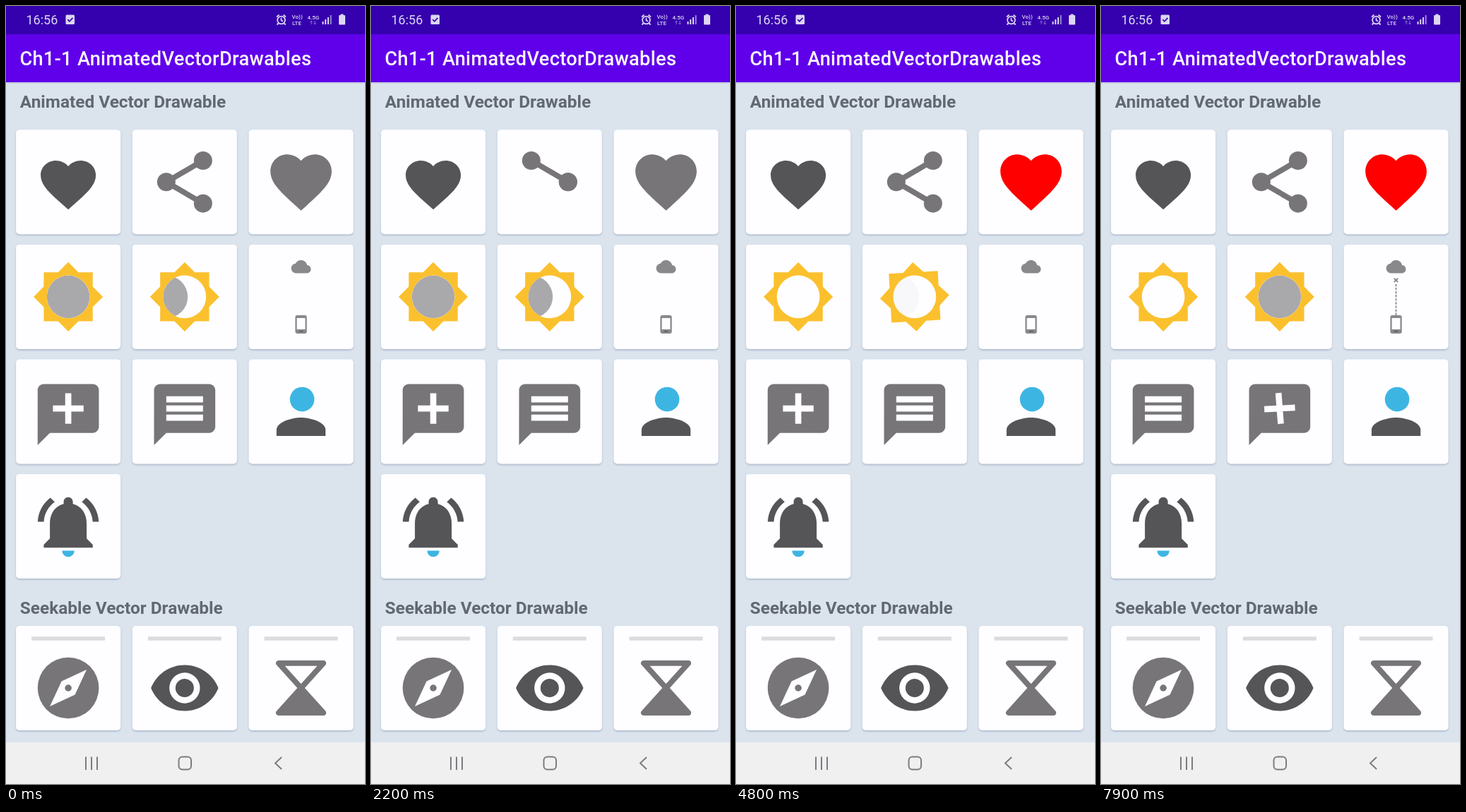
These frames come from a looping animation (508 by 1102 pixels, 8000 ms). An HTML page:

```html
<!DOCTYPE html>
<html lang="en">
<head>
<meta charset="utf-8">
<title>Animated vector icons</title>
<style>
html, body { margin: 0; width: 100%; height: 100%; overflow: hidden; background: #dbe3ed; }
svg { display: block; width: 100vw; height: 100vh; }
text { font-family: Roboto, sans-serif; }
.head { font-size: 24.4px; font-weight: 700; fill: #626871; }
.tiny { font-size: 8px; font-weight: 500; fill: #dcd6f2; }
.g { fill: #777578; }
.d { fill: #555457; }
.c { fill: #89888a; }
.w { fill: #fefdff; }
.y { fill: #fbc02d; }
.m { fill: #a9a8ab; }
.b { fill: #3db5e3; }
.line { stroke: #777578; fill: none; }
</style>
</head>
<body>
<svg id="stage" viewBox="0 0 508 1102" preserveAspectRatio="none"></svg>
<script>
const LOOP = 8000;
const UNIT = 104 / 24;
const COLS = [88.1, 252.8, 417.5];
const stage = document.getElementById('stage');

const HEART = 'M12 21.35l-1.45-1.32C5.4 15.36 2 12.28 2 8.5 2 5.42 4.42 3 7.5 3c1.74 0 3.41.81 4.5 2.09C13.09 3.81 14.76 3 16.5 3 19.58 3 22 5.42 22 8.5c0 3.78-3.4 6.86-8.55 11.54z';
const STAR = 'M20 8.69V4h-4.69L12 .69 8.69 4H4v4.69L.69 12 4 15.31V20h4.69L12 23.31 15.31 20H20v-4.69L23.31 12z';
const BUBBLE = 'M20 2H4c-1.1 0-1.99.9-1.99 2L2 22l4-4h14c1.1 0 2-.9 2-2V4c0-1.1-.9-2-2-2z';
const BELL = 'M7.58 4.08L6.15 2.65C3.75 4.48 2.17 7.3 2.03 10.5h2c.15-2.65 1.51-4.97 3.55-6.42zM19.97 10.5h2c-.15-3.2-1.73-6.02-4.12-7.85l-1.42 1.43c2.02 1.45 3.39 3.77 3.54 6.42zM18 11c0-3.07-1.64-5.64-4.5-6.32V4c0-.83-.67-1.5-1.5-1.5s-1.5.67-1.5 1.5v.68C7.63 5.36 6 7.92 6 11v5l-2 2v1h16v-1l-2-2z';
const EYE = 'M12 4.5C7 4.5 2.73 7.61 1 12c1.73 4.39 6 7.5 11 7.5s9.27-3.11 11-7.5c-1.73-4.39-6-7.5-11-7.5z';
const CLOUD = 'M19.35 10.04C18.67 6.59 15.64 4 12 4 9.11 4 6.6 5.64 5.35 8.04 2.34 8.36 0 10.91 0 14c0 3.31 2.69 6 6 6h13c2.76 0 5-2.24 5-5 0-2.64-2.05-4.78-4.65-4.96z';

const path = (d, cls, extra = '') => `<path d="${d}" class="${cls}" ${extra}/>`;
const dot = (x, y, r, cls, extra = '') => `<circle cx="${x}" cy="${y}" r="${r}" class="${cls}" ${extra}/>`;
const rect = (x, y, w, h, fill, extra = '') =>
  `<rect x="${x}" y="${y}" width="${w}" height="${h}" fill="${fill}" ${extra}/>`;
const icon = (x, y, body) =>
  `<g transform="translate(${x} ${y}) scale(${UNIT}) translate(-12 -12)">${body}</g>`;
const card = (x, y) => rect(x - 74, y - 74, 148, 148, '#fefdff', 'rx="5" filter="url(#shadow)"');

const sun = id => path(STAR, 'y', `id="${id}Star"`) + dot(12, 12, 7, 'w')
  + `<g clip-path="url(#disk)">${dot(12, 12, 7, 'm', `id="${id}Moon"`)}</g>`;
const chat = id => `<g transform="translate(0 1)">${path(BUBBLE, 'g')}${path('', 'w', `id="${id}Mark"`)}</g>`;

const share = `<g id="share">
  <path id="arm" class="line" stroke-width="1.8"/>
  ${path('M6 12L18 19', 'line', 'stroke-width="1.8"')}
  ${dot(6, 12, 3, 'g')}${dot(18, 19, 3, 'g')}${dot(18, 5, 3, 'g', 'id="tip"')}</g>`;
const person = dot(12.35, 8, 4, 'b')
  + path('M12 14c-2.67 0-8 1.34-8 4v2h16v-2c0-2.66-5.33-4-8-4z', 'd');
const bell = path(BELL, 'd') + path('M10 20h4a2 2 0 0 1-4 0z', 'b');
const compass = dot(12, 12, 10, 'g')
  + path('M14.19 14.19L6 18l3.81-8.19L18 6z', 'w') + dot(12, 12, 1.1, 'g');
const eye = path(EYE, 'd') + dot(12, 12, 5, 'w') + dot(12, 12, 3, 'd');
const glass = path('M4.7 3.9H19.3L4.7 20.1H19.3Z', 'line', 'stroke-width="1.8" stroke-linejoin="round"')
  + path('M12 12L4.7 20.1H19.3z', 'g');

const upload = `
  <g transform="translate(403.6 355.3) scale(1.16)">${path(CLOUD, 'c')}</g>
  <path d="M414.7 385.7l5.4 5.4m0-5.4l-5.4 5.4" stroke="#89888a" stroke-width="2" id="cross"/>
  <path id="link" stroke="#89888a" stroke-width="1.8" stroke-dasharray="3.4 1.7"/>
  ${rect(409.3, 438, 16.4, 26, '#89888a', 'rx="3"')}
  ${rect(411.6, 442, 11.8, 16, '#fefdff')}
  ${rect(414.8, 460, 5.6, 1.6, '#645a5c')}`;

const statusBar = `
  ${rect(0, 0, 508, 40, '#3500ad')}
  <text x="28.5" y="26" font-size="18" fill="#dcd6f2">16:56</text>
  ${rect(84.5, 12.5, 12.5, 13.5, '#dcd6f2', 'rx="1.5"')}
  <path d="M87.3 19.2l2.5 2.6 4.6-5" fill="none" stroke="#3500ad" stroke-width="1.7"/>
  <g fill="none" stroke="#dcd6f2" stroke-width="1.8">
    <circle cx="389.5" cy="20" r="5.4"/>
    <path d="M389.5 16.7v3.6l2.5 1.5M383 15.5l3.5-3M396 15.5l-3.5-3M385.4 24.5l-2 2M393.6 24.5l2 2"/>
  </g>
  <text class="tiny" x="404.5" y="18">Vo))</text><text class="tiny" x="405" y="26.5">LTE</text>
  <text class="tiny" x="426.5" y="18.5">4.5G</text>
  <path d="M432 26v-5m-1.6 1.6l1.6-1.6 1.6 1.6M437 21v5m-1.6-1.6l1.6 1.6 1.6-1.6" fill="none" stroke="#8f78d2"/>
  ${[4, 7, 10, 13].map((h, i) => rect(447.5 + i * 3.7, 26 - h, 2, h, i < 3 ? '#dcd6f2' : '#9d88d8')).join('')}
  ${rect(471, 13, 9, 13.5, '#dcd6f2', 'rx="1"')}${rect(473.5, 11.5, 4, 2, '#dcd6f2')}`;

const navBar = `
  ${rect(0, 1043, 508, 59, '#f0f0f1')}
  <g fill="none" stroke="#7c7b7e" stroke-width="2">
    <path d="M113 1063.5v18.5M121 1063.5v18.5M129 1063.5v18.5M390 1064l-9 8.5 9 8.5"/>
    <rect x="244.5" y="1063.5" width="17.5" height="18" rx="5"/>
  </g>`;

const rows = [249.3, 411.9, 574.4, 736.9, 952];
const icons = [
  [path(HEART, 'd', 'id="beat"'), share, path(HEART, 'g', 'id="like"')],
  [sun('a'), sun('b'), ''],
  [chat('p'), chat('q'), person],
  [bell],
  [compass, eye, glass]
];
const grid = icons.map((row, r) => row.map((body, c) => {
  const seek = r === 4;
  const bar = seek ? rect(COLS[c] - 52, 893.3, 104, 5.4, '#dcdbde') : '';
  return card(COLS[c], rows[r]) + bar + icon(COLS[c], rows[r] + (seek ? 14 : 0), body);
}).join('')).join('');

stage.innerHTML = `
  <defs>
    <filter id="shadow" x="-10%" y="-10%" width="120%" height="120%">
      <feDropShadow dx="0" dy="1.4" stdDeviation="1.3" flood-color="#54708a" flood-opacity=".4"/>
    </filter>
    <clipPath id="disk"><circle cx="12" cy="12" r="7"/></clipPath>
  </defs>
  ${rect(0, 0, 508, 1102, '#dbe3ed')}
  ${rect(0, 108, 508, 2, '#c9d0e0')}
  ${rect(0, 39, 508, 69, '#6000ea')}
  ${statusBar}
  <text x="19.5" y="84" font-size="27.17" font-weight="500" letter-spacing=".34" fill="#fdfaff">Ch1-1 AnimatedVectorDrawables</text>
  <text class="head" x="19.8" y="144">Animated Vector Drawable</text>
  <text class="head" x="19.8" y="861">Seekable Vector Drawable</text>
  ${grid}${upload}${navBar}`;

const part = {};
stage.querySelectorAll('[id]').forEach(el => part[el.id] = el);
const set = (id, name, value) => part[id].setAttribute(name, value);

const mix = (a, b, p) => a + (b - a) * p;
const span = (t, from, to) => Math.min(1, Math.max(0, (t - from) / (to - from)));
const ease = (t, from, to) => (1 - Math.cos(Math.PI * span(t, from, to))) / 2;

function drawSun(id, p, alpha) {
  set(id + 'Star', 'transform', `rotate(${-45 * p} 12 12)`);
  set(id + 'Moon', 'cx', mix(6, 12, p));
  set(id + 'Moon', 'opacity', alpha);
}

// p = 0 shows three lines, p = 1 a plus whose upright is folded from the outer lines.
function drawMark(id, p) {
  const half = mix(6, 5, p), gap = 3 * (1 - p), turn = p * 90;
  const bar = (y, deg) => {
    const a = deg * Math.PI / 180, c = Math.cos(a), s = Math.sin(a);
    const at = (x, v) => `${12 + x * c - v * s} ${10 + y + x * s + v * c}`;
    return `M${at(-half, -1)}L${at(half, -1)}L${at(half, 1)}L${at(-half, 1)}z`;
  };
  set(id + 'Mark', 'd', bar(0, 0) + bar(-gap, turn) + bar(gap, turn));
  set(id + 'Mark', 'transform', `rotate(${-180 * (1 - p)} 12 10)`);
}

function draw(t) {
  const pulse = (1 - Math.cos(span(t, 600, 1400) * 4 * Math.PI)) / 2;
  const size = mix(0.9, 1.04, pulse);
  set('beat', 'transform', `translate(12 13) scale(${size} ${size * 0.966}) translate(-12 -12.18)`);

  const turn = 180 * (ease(t, 1500, 2050) + ease(t, 2400, 2950));
  const reach = 1 - ease(t, 1750, 2100) + ease(t, 2250, 2550);
  const x = mix(6, 18, reach), y = mix(12, 5, reach);
  set('share', 'transform', `rotate(${turn} 12 12)`);
  set('arm', 'd', `M6 12L${x} ${y}`);
  set('tip', 'cx', x);
  set('tip', 'cy', y);

  const red = ease(t, 2400, 3120);
  const rgb = [mix(119, 254, red), mix(117, 0, red), mix(120, 0, red)].map(Math.round);
  set('like', 'style', `fill:rgb(${rgb})`);

  const day = 1 - ease(t, 3350, 4300);
  drawSun('a', day, day);
  const night = ease(t, 4640, 5580);
  drawSun('b', night, t < 4640 ? 1 : night);

  set('cross', 'opacity', span(t, 6250, 6500));
  const rise = span(t, 6550, 7450);
  set('link', 'd', `M417.5 438V${mix(438, 393, rise)}`);

  drawMark('p', 1 - ease(t, 6700, 7250));
  drawMark('q', ease(t, 7350, 7950));
}

const start = performance.now();
function tick() {
  draw((performance.now() - start) % LOOP);
  requestAnimationFrame(tick);
}
tick();
</script>
</body>
</html>
```
